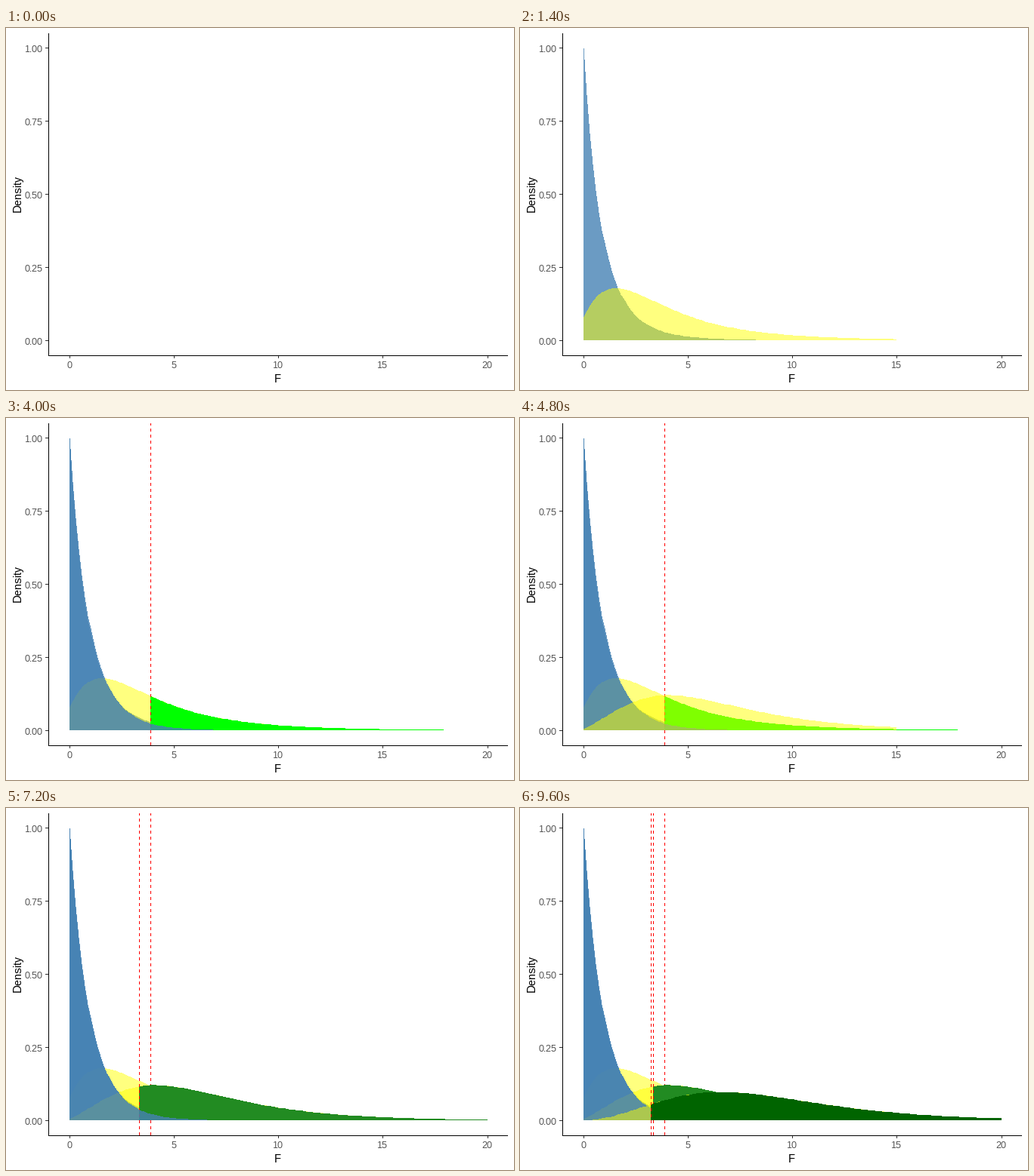
Write a matplotlib script that moves like this. It is 672x480 px and loops after 10000 ms.

```python
import numpy as np
import matplotlib.pyplot as plt
from matplotlib.animation import FuncAnimation

W, H, DPI = 672, 480, 96
INTERVAL, LOOP = 100, 10000
PX = 72 / DPI                      # one pixel in points
X0, X_UNIT = 84.1, 27.65           # pixel position of 0 and pixels per unit
Y0, Y_UNIT = 414.89, 388.15
LEFT, RIGHT, TOP, BOTTOM = 56, 664, 7, 434

plt.rcParams.update({
    "font.family": "Liberation Sans",
    "text.hinting": "native",
    "text.hinting_factor": 1,
    "path.simplify": False,
})

fig = plt.figure(figsize=(W / DPI, H / DPI), dpi=DPI, facecolor="white")
ax = fig.add_axes([0, 0, 1, 1])
ax.set_xlim(0, W)
ax.set_ylim(H, 0)
ax.axis("off")


def to_px(x, y):
    """Data to whole pixels."""
    return (np.floor(X0 + X_UNIT * np.asarray(x)),
            np.floor(Y0 - Y_UNIT * np.asarray(y)))


def f_density(x, df2, ncp=0.0):
    """Density of the (noncentral) F distribution with 2 and df2 degrees."""
    b = df2 / 2
    u = x / (b + x)
    term = np.full_like(x, np.exp(-ncp / 2))
    total = term.copy()
    for j in range(1, 70):
        term = term * (ncp / 2) / j * (b + j) / j * u
        total += term
    return total * (1 - u) ** (b + 1)


def f_critical(df2, alpha=0.05):
    """Upper quantile, in closed form for 2 numerator degrees."""
    return df2 / 2 * (alpha ** (-2 / df2) - 1)


def area(start, end, df2, ncp, color, alpha, z):
    """Area under the density, one hard-edged column per pixel."""
    x = np.linspace(start, end, 101)
    px, py = to_px(x, f_density(x, df2, ncp))
    edges = np.arange(px[0], px[-1] + 1)
    tops = np.ceil(np.interp(edges[:-1] + 1e-3, px, py))
    return ax.stairs(tops, edges, baseline=to_px(0, 0)[1], fill=True,
                     color=color, alpha=alpha, snap=False, zorder=z)


def line(xs, ys, color, z, style="-"):
    return ax.plot(xs, ys, color=color, lw=PX, ls=style, snap=False,
                   solid_capstyle="butt", dash_capstyle="butt", zorder=z)[0]


def cutoff(x, z):
    col = to_px(x, 0)[0] + 0.5
    return line([col, col], [BOTTOM, TOP], "red", z, (0, (4, 4)))


def label(x, y, text, size, color, ha="center", rotation=0):
    ax.text(x, y, text, fontsize=size * PX, color=color, ha=ha, va="baseline",
            rotation=rotation, rotation_mode="anchor", zorder=60)


def draw_axes():
    for v in np.arange(5) / 4:
        row = to_px(0, v)[1]
        line([LEFT - 4, LEFT], [row + 0.5] * 2, "#333333", 50)
        label(49, row + 6, f"{v:.2f}", 12, "#4D4D4D", ha="right")
    for v in range(0, 21, 5):
        col = to_px(v, 0)[0]
        line([col + 0.5] * 2, [BOTTOM + 1, BOTTOM + 4], "#333333", 50)
        label(X0 + X_UNIT * v - 0.5, 451, str(v), 12, "#4D4D4D")
    line([LEFT + 0.5] * 2, [TOP, BOTTOM + 1], "black", 51)
    line([LEFT, RIGHT], [BOTTOM + 0.5] * 2, "black", 51)
    label((LEFT + RIGHT - 1) / 2, 470, "F", 15, "black")
    label(20, 219, "Density", 15, "black", rotation=90)


draw_axes()

# Each study: denominator degrees, noncentrality, colour of the power area
studies = [(12, 5, "#00FF00"), (27, 10, "#228B22"), (42, 15, "#006400")]

layers = []
for df2, ncp, power in studies:
    z = 2 + len(layers)
    crit = f_critical(df2)
    layers += [
        area(0, 15, df2, 0, "#4682B4", 0.8, z),
        area(0, 15, df2, ncp, "#FFFF00", 0.5, z + 1),
        area(crit, 20, df2, ncp, power, 1, z + 2),
        cutoff(crit, z + 3),
    ]

starts = [500, 1400, 2300] + list(range(3200, LOOP, 800))


def update(frame):
    now = frame * INTERVAL
    for layer, start in zip(layers, starts):
        layer.set_visible(now >= start)
    return layers


anim = FuncAnimation(fig, update, frames=LOOP // INTERVAL, interval=INTERVAL,
                     repeat=True, repeat_delay=0, blit=False)
plt.show()
```
